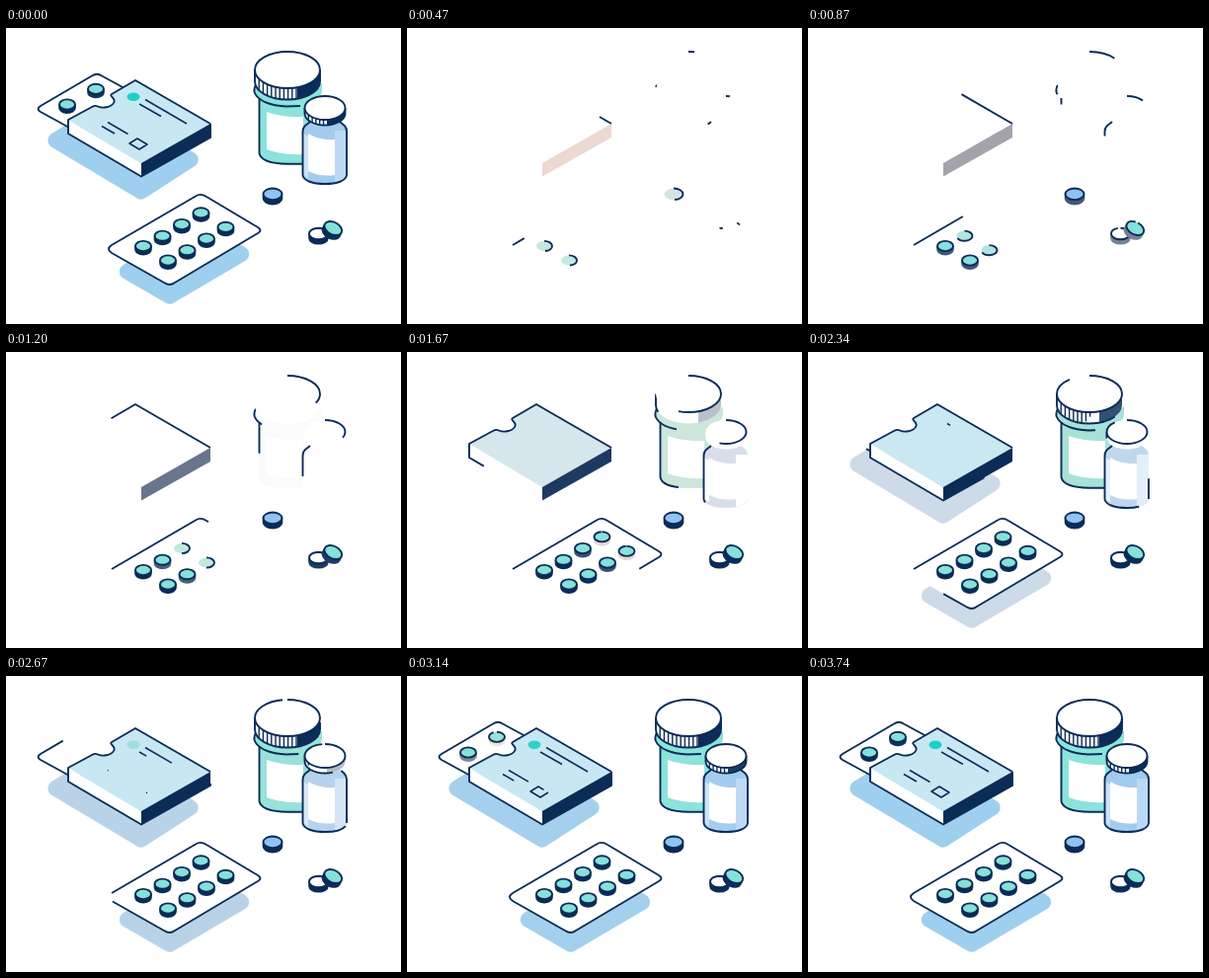
These frames come from a looping animation (400x300 px, 3.94 s). An HTML page with a canvas:

```html
<!DOCTYPE html>
<html lang="en">
<head>
<meta charset="utf-8">
<title>Medicine line drawing</title>
<style>
html, body { margin: 0; width: 100%; height: 100%; overflow: hidden; background: #fff; }
canvas { display: block; width: 400px; height: 300px; }
svg { position: absolute; }
</style>
</head>
<body>
<canvas width="400" height="300"></canvas>
<svg width="0" height="0"><path/></svg>
<script>
const ctx = document.querySelector('canvas').getContext('2d');
const ruler = document.querySelector('path');
const LOOP = 3940, FIRST = 70, LAST = 3740, STEP = (LAST - FIRST) / 55;
const NAVY = '#0a2c57', TEAL = '#86e0db';
let now = 0;

const clamp = x => Math.max(0, Math.min(1, x));
const sine = x => (1 - Math.cos(Math.PI * clamp(x))) / 2;
const progress = (start, length) => sine((now - start) / length);

// Colour at the current time along [time, colour, time, colour, ...].
function tint(stops) {
  if (now <= stops[0]) return stops[1];
  for (let i = 2; i < stops.length; i += 2) {
    if (now > stops[i]) continue;
    const k = (now - stops[i - 2]) / (stops[i] - stops[i - 2]);
    const rgb = c => [1, 3, 5].map(n => parseInt(c.slice(n, n + 2), 16));
    const a = rgb(stops[i - 1]), b = rgb(stops[i + 1]);
    return `rgb(${a.map((v, n) => Math.round(v + (b[n] - v) * k))})`;
  }
  return stops[stops.length - 1];
}

const cache = new Map();
function shape(d) {
  if (!cache.has(d)) {
    ruler.setAttribute('d', d);
    cache.set(d, { path: new Path2D(d), length: ruler.getTotalLength() });
  }
  return cache.get(d);
}

function fill(d, color) {
  ctx.fillStyle = color;
  ctx.fill(shape(d).path);
}

function line(d, start = 110, length = 2900, width = 1.9) {
  const k = progress(start, length), s = shape(d);
  if (k <= 0) return;
  ctx.strokeStyle = NAVY;
  ctx.lineWidth = width;
  ctx.setLineDash(k < 1 ? [s.length * k, s.length + 9] : []);
  ctx.stroke(s.path);
  ctx.setLineDash([]);
}

const oval = (x, y, rx, ry) =>
  `M${x} ${y - ry}A${rx} ${ry} 0 0 1 ${x} ${y + ry}A${rx} ${ry} 0 0 1 ${x} ${y - ry}Z`;

function roundedFill(points, radius, color) {
  const [first, last] = [points[0], points[points.length - 1]];
  ctx.beginPath();
  ctx.moveTo((first[0] + last[0]) / 2, (first[1] + last[1]) / 2);
  points.forEach((p, i) => ctx.arcTo(...p, ...points[(i + 1) % points.length], radius));
  ctx.closePath();
  ctx.fillStyle = color;
  ctx.fill();
}

// The outline begins `lead` ms before the fills.
function pill(x, y, start, { rx = 8, ry = 5.1, depth = 3.6, color = TEAL, pale = '#c8e8e0', draw = 260, lead = 20, angle = 0 } = {}) {
  if (now < start - lead) return;
  ctx.save();
  ctx.translate(x, y);
  ctx.rotate(angle);
  const edge = rx + 0.8, top = oval(0, 0, rx, ry);
  if (now > start) {
    fill(`M${-edge} 0V${depth}A${edge} ${ry + 0.8} 0 0 0 ${edge} ${depth}V0Z`,
      tint([start + 130, '#ffffff', start + 210, '#e8d9d4', start + 460, '#4a5f80', start + 840, NAVY]));
    fill(top, tint([start, '#ffffff', start + 100, pale, start + 220, color]));
  }
  line(top, start - lead, draw);
  ctx.restore();
}

function cap({ x, y, rx, ry, height, split, navy, side, ribs, ribGap, ribStart }) {
  const body = `M${x - rx} ${y}V${y + height}A${rx} ${ry} 0 0 0 ${x + rx} ${y + height}V${y}`;
  fill(body, '#ffffff');
  ctx.save();
  ctx.beginPath();
  ctx.rect(split, 0, 100, 300);
  ctx.clip();
  fill(body, tint(navy));
  ctx.restore();
  for (let i = 0; i < ribs; i++) {
    const ribX = x - rx + ribGap * (i + 1);
    const ribY = y + ry * Math.sqrt(1 - ((ribX - x) / rx) ** 2);
    line(`M${ribX} ${ribY}v${height}`, ribStart + i * 75, 260, 1.4);
  }
  line(body, ...side);
  fill(oval(x, y, rx, ry), '#ffffff');
  line(oval(x, y, rx, ry));
}

function shadows() {
  const color = tint([1665, '#ffffff', 2000, '#e2e2e5', 2670, '#b8d3e8', 3250, '#9fcfee']);
  roundedFill([[35, 114], [100, 74], [202, 133], [137, 175]], 8, color);
  roundedFill([[107, 247], [195, 195], [254, 229], [166, 281]], 8, color);
}

function rearBlister() {
  const sheet = 'M66 102L35 85Q30 82 35 79L87 48.5Q92 45 97 48.5L120 61';
  if (now > 2190) fill(sheet + 'L110 90Z', '#ffffff');
  line(sheet, 2190, 970);
  pill(62, 77.5, 2760);
  pill(91, 61.8, 2950);
}

function carton() {
  const notch = 'L107 67C104 69 111 71 109.500 75C107 81 97 81.500 93 79.500C90 78 89 79 87 80';
  const front = 'M63 93L137 137V150.500L63 107Z';
  const outline = `M207 97L131 53${notch}L63 93V107L137 150.500L207 111V97`;
  if (now > 1250) fill(front, '#ffffff');
  fill(`M207 97L131 53${notch}L63 93L137 137Z`,
    tint([1200, '#ffffff', 1670, '#d5e7ec', 2000, '#cce8f0', 2670, '#c7e8f3']));
  fill('M137 137L207 97V111L137 150.500Z',
    tint([380, '#ffffff', 470, '#ebd9d2', 1200, '#69768c', 1670, '#1f3a62', 2000, NAVY]));
  line(outline);

  if (now > 2350) {
    fill(oval(129, 69.7, 6.5, 4.2),
      tint([2350, '#c7e8f3', 2670, '#a0e0de', 3200, '#20d0c4']));
  }
  line('M141 72.500L183 97', 2200, 800, 1.5);
  line('M135 77L157 89.500', 2400, 700, 1.5);
  line('M103 95.500L123.500 107.500', 2600, 600, 1.5);
  line('M97 99.500L110 107', 2680, 600, 1.5);
  line('M143 118L135 123L125 117L133 112Z', 2600, 700, 1.5);
}

function frontBlister() {
  const sheet = 'M107 220L192 170.500Q197 167 203 171L255 202Q260 205 255 208L171 258Q166 262 160 258L107 228Q101 224 107 220';
  fill(sheet, '#ffffff');
  line(sheet);
  const upper = [[139, 221], [158.500, 210.700], [178, 199], [197.500, 187.300]];
  upper.forEach(([x, y], i) => {
    pill(x, y, 365 + i * 365);
    pill(x + 25, y + 14.500, 365 + i * 365);
  });
}

function largeBottle() {
  const color = tint([1150, '#ffffff', 1670, '#cde6dc', 2000, '#b5e2d8', 2670, '#98e2da', 3150, '#8ce3dc']);
  fill('M256 66V127C257 135 270 138 285 138H314V66Z', color);
  fill('M264 85Q280 91 301 90V128Q278 129 264 123Z', '#ffffff');
  fill('M252 56V66C256 75 270 79.500 285 79.500C303 79.500 319 73 320 64V56Z', color);
  line('M256.500 71V127C258 134 268 137.500 285 137.700H301', 618, 1577);
  line('M253.500 57Q251 60 251.500 65C255 74 268 79 284 79.500L298 79', 30, 2980);
  cap({
    x: 285, y: 42.500, rx: 33, ry: 18.500, height: 11.500, split: 295,
    navy: [1450, '#ffffff', 1670, '#b8c0cc', 2000, '#60758f', 2670, NAVY],
    side: [1200, 1700], ribs: 10, ribGap: 4.200, ribStart: 1700
  });
}

function smallBottle() {
  const left = 'M308 95C304 98 300.500 100 300.500 105V149C301 155 311 158 323 158C335 158 344.500 155 345 149';
  const right = 'V105C345 100 342 98 338 95';
  const color = tint([1200, '#ffffff', 1670, '#d8dee9', 2000, '#cbdbea', 2670, '#b5d3ec', 3200, '#a2cbee']);
  const late = tint([1800, '#ffffff', 2670, '#d3e5f5', 3200, '#bbd9f4']);
  const pale = tint([1700, '#ffffff', 2670, '#d8e8f6', 3200, '#cbe2f6']);
  fill(left + right, color);
  fill('M333 104H345V149Q343 155 333 157Z', late);
  fill('M301 107L306 110V152L301 149Z', pale);
  fill('M306 107Q317 114 333 113V149Q318 151 306 145Z', '#ffffff');
  line(left);
  line('M345 149' + right, 2050, 700);
  cap({
    x: 323, y: 81, rx: 20.500, ry: 12, height: 5.500, split: 325,
    navy: [2450, '#ffffff', 2670, '#b5bcc8', 3200, NAVY],
    side: [2150, 900], ribs: 5, ribGap: 3.800, ribStart: 2550
  });
}

function loosePills() {
  const size = { rx: 9.500, ry: 5.800, depth: 4.500 };
  const slow = { draw: 600, lead: 110 };
  pill(270, 168.300, 365, { ...size, color: '#8fc3f3', pale: '#dae3e6' });
  pill(316.500, 208.500, 480, { ...size, ...slow, color: '#ffffff', pale: '#ffffff' });
  pill(331.300, 203, 480, { ...size, ...slow, ry: 6.200, angle: 0.480 });
}

function render(time) {
  const t = time % LOOP;
  now = t < FIRST ? LAST : Math.min(LAST, FIRST + Math.floor((t - FIRST) / STEP + 0.12) * STEP);
  ctx.fillStyle = '#ffffff';
  ctx.fillRect(0, 0, 400, 300);
  ctx.lineJoin = 'round';
  shadows();
  rearBlister();
  carton();
  frontBlister();
  largeBottle();
  smallBottle();
  loosePills();
}

let origin = null;
function tick(time) {
  origin ??= time;
  render(time - origin);
  requestAnimationFrame(tick);
}
render(0);
requestAnimationFrame(tick);
</script>
</body>
</html>
```
